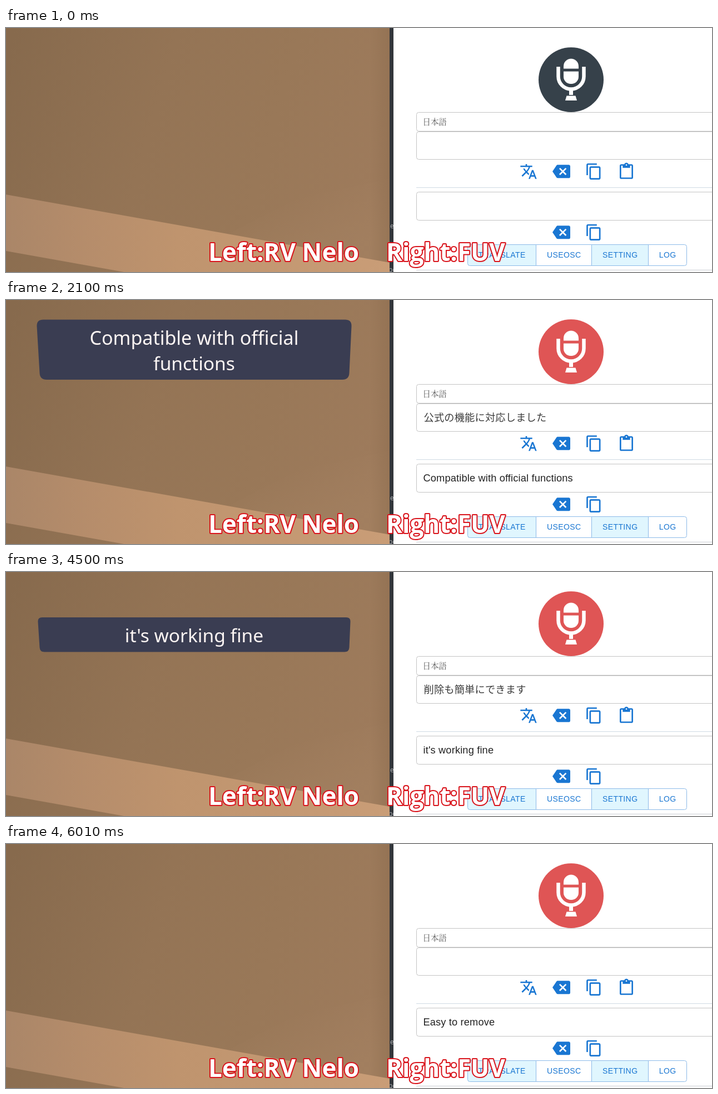
An HTML page for the animation above (6.19 s loop, 1270 by 441 pixels).

```html
<!DOCTYPE html>
<html lang="en">
<head>
<meta charset="utf-8">
<title>Speech translation demo</title>
<style>
  html, body { margin: 0; width: 100%; height: 100%; overflow: hidden; background: #fff; }
  svg { display: block; width: 1270px; height: 441px; }
  .field { fill: #fff; stroke: #c4c4c4; }
  .input { font: 18.2px "Liberation Sans", "Noto Sans CJK JP", "Noto Sans CJK", sans-serif; letter-spacing: .00938em; fill: #212121; }
  .ja { font-family: "Noto Sans CJK JP", "Noto Sans CJK", sans-serif; font-weight: 300; letter-spacing: .012em; fill: #3a3a3a; }
  .lang { font: 300 14.4px "Noto Serif CJK JP", "Noto Sans CJK JP", "Noto Sans CJK", serif; fill: #555; }
  .icons { fill: #1976d2; }
  .tab { font: 14px "Liberation Sans", Arial, sans-serif; letter-spacing: .02857em; fill: #1976d2; text-anchor: middle; }
  .bubble { font-family: "Noto Sans", "Open Sans", sans-serif; fill: #fdf6f4; text-anchor: middle; }
  .caption { font: bold 44px "Open Sans", "Noto Sans", sans-serif; fill: #fff; stroke: #d9141c; stroke-width: 4; stroke-linejoin: round; paint-order: stroke; }
  .edge { font: 12px "Noto Sans", sans-serif; fill: #a5a8ab; }
</style>
</head>
<body>
<svg viewBox="0 0 1270 441" xmlns="http://www.w3.org/2000/svg">
  <defs>
    <linearGradient id="wall" gradientUnits="userSpaceOnUse" x1="0" y1="60" x2="680" y2="250">
      <stop offset="0" stop-color="#876a4d"/>
      <stop offset=".4" stop-color="#947455"/>
      <stop offset=".7" stop-color="#997858"/>
      <stop offset="1" stop-color="#9e7b5c"/>
    </linearGradient>
    <linearGradient id="band" gradientUnits="userSpaceOnUse" x1="0" y1="0" x2="690" y2="0">
      <stop offset="0" stop-color="#aa8668"/>
      <stop offset=".22" stop-color="#b68d6b"/>
      <stop offset=".45" stop-color="#bf946e"/>
      <stop offset="1" stop-color="#c99d77"/>
    </linearGradient>
    <linearGradient id="glow" gradientUnits="userSpaceOnUse" x1="560" y1="290" x2="600" y2="400">
      <stop offset="0" stop-color="#a58262" stop-opacity="0"/>
      <stop offset="1" stop-color="#a58262" stop-opacity=".5"/>
    </linearGradient>
    <linearGradient id="shade">
      <stop offset="0" stop-color="#8a6a4c" stop-opacity="0"/>
      <stop offset="1" stop-color="#8a6a4c" stop-opacity=".45"/>
    </linearGradient>
    <clipPath id="gap"><rect x="690" width="7" height="441"/></clipPath>
    <path id="translate" d="M12.87 15.07l-2.54-2.51.03-.03c1.74-1.94 2.98-4.17 3.71-6.53H17V4h-7V2H8v2H1v1.99h11.17C11.5 7.92 10.44 9.75 9 11.35 8.07 10.32 7.3 9.19 6.69 8h-2c.73 1.63 1.73 3.17 2.98 4.56l-5.09 5.02L4 19l5-5 3.11 3.11zM18.5 10h-2L12 22h2l1.12-3h4.75L21 22h2zm-2.62 7l1.62-4.33L19.12 17z"/>
    <path id="erase" d="M22 3H7c-.69 0-1.23.35-1.59.88L0 12l5.41 8.11c.36.53.9.89 1.59.89h15c1.1 0 2-.9 2-2V5c0-1.1-.9-2-2-2zm-3 12.59L17.59 17 14 13.41 10.41 17 9 15.59 12.59 12 9 8.41 10.41 7 14 10.59 17.59 7 19 8.41 15.41 12z"/>
    <path id="copy" d="M16 1H4c-1.1 0-2 .9-2 2v14h2V3h12zm3 4H8c-1.1 0-2 .9-2 2v14c0 1.1.9 2 2 2h11c1.1 0 2-.9 2-2V7c0-1.1-.9-2-2-2zm0 16H8V7h11z"/>
    <path id="paste" d="M19 2h-4.18C14.4.84 13.3 0 12 0c-1.3 0-2.4.84-2.82 2H5c-1.1 0-2 .9-2 2v16c0 1.1.9 2 2 2h14c1.1 0 2-.9 2-2V4c0-1.1-.9-2-2-2zm-7 0c.55 0 1 .45 1 1s-.45 1-1 1-1-.45-1-1 .45-1 1-1zm7 18H5V4h2v3h10V4h2z"/>
  </defs>

  <!-- room view -->
  <rect width="690" height="441" fill="url(#wall)"/>
  <path d="M400 372L520 310 690 272V424z" fill="url(#glow)"/>
  <path d="M655 0H690V424L655 418z" fill="url(#shade)"/>
  <path d="M0 301L690 424V441H212L0 403z" fill="url(#band)"/>
  <g id="bubble" class="bubble">
    <path id="plate" fill="#3a3d52"/>
    <text id="line1" x="338.5" y="81" font-size="34"></text>
    <text id="line2" x="338.5" y="127" font-size="33.5"></text>
  </g>

  <!-- window edge -->
  <rect x="690" width="7" height="441" fill="#32363b"/>
  <g class="edge" clip-path="url(#gap)">
    <text x="691" y="362">e</text>
    <text x="688" y="441">po</text>
  </g>

  <!-- app panel -->
  <rect x="697" width="573" height="441" fill="#fff"/>
  <circle id="mic" cx="1016.5" cy="93.5" r="58.5"/>
  <g fill="#fff">
    <path d="M1003 73.500V69a13.500 13.500 0 0 1 27 0V73.500z"/>
    <path d="M1003 78.500H1030V88a13 13 0 0 1-13 13h-1a13 13 0 0 1-13-13z"/>
    <path d="M993.500 70V87.500a23 23 0 0 0 46 0V70" fill="none" stroke="#fff" stroke-width="6.500"/>
    <path d="M1013 112H1020V121H1013zM1008.500 122.500H1024.500L1027 131H1006z"/>
  </g>
  <rect class="field" x="738.5" y="152.5" width="560" height="34" rx="4"/>
  <rect class="field" x="738.5" y="187.5" width="560" height="50" rx="4"/>
  <text class="lang" x="749.5" y="175">日本語</text>
  <text id="spoken" class="input ja" x="751.5" y="218.500"></text>
  <path d="M738 288.5H1270" stroke="#cfdae4"/>
  <rect class="field" x="738.5" y="296.5" width="560" height="51" rx="4"/>
  <g id="hover">
    <rect x="910" y="239" width="58" height="42" rx="3" fill="#f7fafd"/>
    <rect x="916" y="297" width="46" height="13" rx="3" fill="#f8f8f9"/>
  </g>
  <text id="result" class="input" x="750.500" y="328"></text>
  <g id="icons" class="icons"></g>
  <g id="tabs"></g>
  <path d="M738 437.5H1270" stroke="#c9cdd3"/>

  <text class="caption" x="364" y="420.500">Left:RV Nelo</text>
  <text class="caption" x="684" y="420.500">Right:FUV</text>
</svg>
<script>
const LOOP = 6190;
const $ = id => document.getElementById(id);

// start time -> values that change from then on
const steps = [
  [0, { mic: '#36414a', spoken: '', result: '', bubble: [], hover: false }],
  [600, { mic: '#df5555' }],
  [900, { spoken: '公式の' }],
  [1200, { spoken: 'こうしきの機能に対応し' }],
  [1500, { spoken: 'こうしきの機能に対応しまし' }],
  [1800, { spoken: '公式の機能に対応しました' }],
  [2100, { result: 'Compatible with official functions', bubble: ['Compatible with official', 'functions'] }],
  [2700, { spoken: '問題なく動作し' }],
  [3000, { spoken: '問題なく動作しています' }],
  [3600, { result: "it's working fine", bubble: ["it's working fine"] }],
  [4200, { spoken: '削除も簡単にでき' }],
  [4500, { spoken: '削除も簡単にできます' }],
  [5110, { result: 'Easy to remove', bubble: ['Easy to remove'], hover: true }],
  [5410, { spoken: '', bubble: [], hover: false }],
];

const icons = [
  ['translate', 940, 259.3], ['erase', 999, 259.3], ['copy', 1057.5, 259.3],
  ['paste', 1116, 259.5], ['erase', 999, 369.3], ['copy', 1057.5, 369.3],
];
$('icons').innerHTML = icons.map(([id, x, y]) =>
  `<use href="#${id}" transform="translate(${x} ${y}) scale(1.333) translate(-12 -12)"/>`).join('');

const tabs = [
  ['TRANSLATE', 830.5, 953.5, true], ['USEOSC', 953.5, 1053.5, false],
  ['SETTING', 1053.5, 1155.5, true], ['LOG', 1155.5, 1224.5, false],
];
$('tabs').innerHTML = tabs.map(([name, a, b, on], i) => {
  const l = i === 0 ? 4 : 0, r = i === tabs.length - 1 ? 4 : 0;
  const d = `M${a + l} 391.5H${b - r}q${r} 0 ${r} ${r}V${429.5 - r}q0 ${r} ${-r} ${r}H${a + l}` +
    `q${-l} 0 ${-l} ${-l}V${391.5 + l}q0 ${-l} ${l} ${-l}z`;
  return `<path d="${d}" fill="${on ? '#e0f6fe' : '#fff'}" stroke="#8cbae8"/>` +
    `<text class="tab" x="${(a + b) / 2 + .2}" y="414.5">${name}</text>`;
}).join('');

// slightly tapered plate with rounded corners
function plate(l, r, top, bl, br, bottom, c) {
  return `M${l + c} ${top}H${r - c}Q${r} ${top} ${r - .5} ${top + c}` +
    `L${br + .5} ${bottom - c}Q${br} ${bottom} ${br - c} ${bottom}` +
    `H${bl + c}Q${bl} ${bottom} ${bl - .5} ${bottom - c}` +
    `L${l + .5} ${top + c}Q${l} ${top} ${l + c} ${top}z`;
}

function setBubble(lines) {
  $('bubble').style.display = lines.length ? '' : 'none';
  const two = lines.length === 2;
  $('plate').setAttribute('d', two
    ? plate(55, 622, 35.5, 61, 617, 144, 12)
    : plate(57, 620, 82, 61, 617, 144.5, 8));
  $('line1').textContent = two ? lines[0] : '';
  $('line2').textContent = lines[lines.length - 1] || '';
}

function show(s) {
  $('mic').setAttribute('fill', s.mic);
  $('spoken').textContent = s.spoken;
  $('result').textContent = s.result;
  $('hover').style.display = s.hover ? '' : 'none';
  setBubble(s.bubble);
}

let last = -1;
function tick() {
  const t = performance.now() % LOOP;
  const n = steps.filter(([at]) => at <= t).length;
  if (n !== last) {
    last = n;
    show(Object.assign({}, ...steps.slice(0, n).map(step => step[1])));
  }
  requestAnimationFrame(tick);
}
tick();
</script>
</body>
</html>
```
